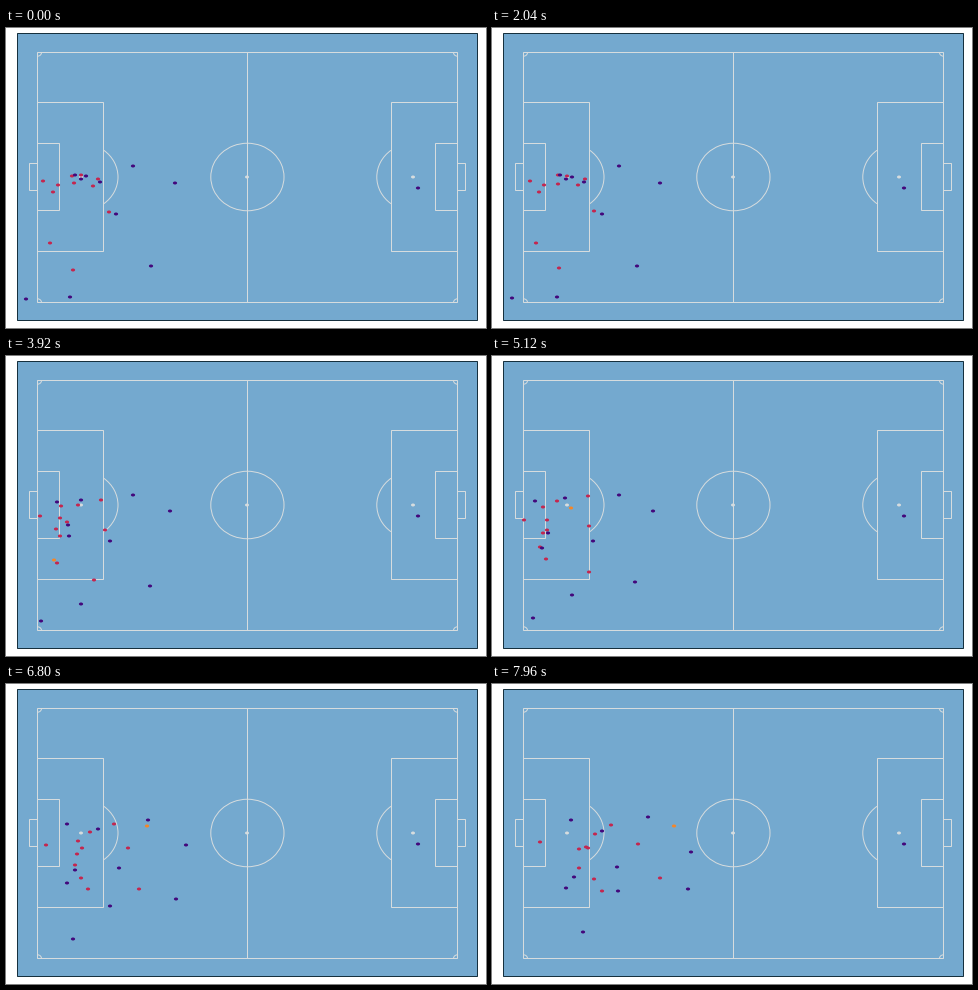
A matplotlib script that plays this animation: 480x300 px, repeating every 8000 ms.

```python
import numpy as np
import matplotlib.pyplot as plt
from matplotlib.animation import FuncAnimation
from matplotlib.collections import EllipseCollection
from matplotlib.patches import Arc, Ellipse, Rectangle

W, H, DPI = 480, 300, 100
FRAMES, STEP = 200, 40
PX = 72 / DPI

GRASS, CHALK, EDGE = "#74a9cf", "#d6dcde", "#16303e"
DARK, RED, BALL = "#43087c", "#c4264f", "#f58628"

LEFT, RIGHT, TOP, BOTTOM = 31, 451, 24, 274
MX, MY = 241, 149
SX, SY = 4.0, 3.69          # pixels per metre
RX, RY = 9.15 * SX, 9.15 * SY

KICK, CLEAR, END = 3120, 5120, 7960   # corner taken, defence moves out, loop end

# Each player: waiting place, place after the corner, place after moving out.
REDS = [
    (37, 152.5, 32, 164, 48, 158.5), (47, 163.5, 51, 177, 87, 184),
    (52, 157, 55, 164.5, 96, 164.5), (66, 147.5, 50, 151, 94, 163.5),
    (75, 147, 54, 175, 87, 165), (68, 155, 47, 192, 102, 195.5),
    (87, 158, 64, 145, 103, 150), (92, 151, 96, 140, 119, 140.5),
    (103, 184, 97, 169, 146, 160), (44, 215, 54, 203, 110, 206.5),
    (67, 242, 98, 215.5, 168, 194),
]
DARKS = [
    (69, 147, 42, 144.5, 79, 136), (75, 150.5, 55, 178, 82, 193),
    (80, 148, 73, 142, 110, 147), (94, 153.5, 48, 193, 74, 204.5),
    (127, 138, 127, 139, 156, 133), (169, 155, 161, 155, 199, 167.5),
    (110, 186, 101, 185, 125, 183), (145, 238.5, 143, 226, 196, 204.5),
    (64, 269, 81, 238, 126, 206.5), (20, 271, 42, 262, 91, 248),
]
KEEPER = (412, 160)

wait, corner, out = np.array(REDS + DARKS, float).reshape(-1, 3, 2).swapaxes(0, 1)
rng = np.random.default_rng(4)
sway = rng.uniform(-1.2, 1.2, wait.shape)
pace = rng.uniform(1500, 2600, (len(wait), 1))

fig = plt.figure(figsize=(W / DPI, H / DPI), dpi=DPI, facecolor="white")
ax = fig.add_axes([0, 0, 1, 1])
ax.set_xlim(0, W)
ax.set_ylim(H, 0)
ax.axis("off")


def box(x0, y0, x1, y1, color=CHALK, fill="none"):
    ax.add_patch(Rectangle((x0, y0), x1 - x0, y1 - y0, lw=PX, ec=color, fc=fill))


def arc(x, y, rx, ry, a, b):
    ax.add_patch(Arc((x, y), 2 * rx, 2 * ry, theta1=a, theta2=b, color=CHALK, lw=PX))


def spot(x):
    ax.add_patch(Ellipse((x, MY), 4, 3, fc=CHALK, ec="none"))


def draw_pitch():
    box(11, 5, 471, 292, EDGE, GRASS)
    box(LEFT, TOP, RIGHT, BOTTOM)
    ax.plot([MX, MX], [TOP, BOTTOM], color=CHALK, lw=PX)
    arc(MX + 0.4, MY, RX, RY, 0, 360)
    spot(MX)
    for goal, side, turn in ((LEFT, 1, 0), (RIGHT, -1, 180)):
        box(goal, 74, goal + side * 66, 223)
        box(goal, 115, goal + side * 22, 182)
        box(goal - side * 8, 135, goal, 162)
        centre = goal + side * 11 * SX
        spot(centre)
        arc(centre + 0.4, MY, RX, RY, turn - 50, turn + 50)
    for x, y, a in ((LEFT, TOP, 0), (RIGHT, TOP, 90),
                    (RIGHT, BOTTOM, 180), (LEFT, BOTTOM, 270)):
        arc(x + 0.5, y + 0.5, SX, SY, a, a + 90)


def players_at(t):
    drop = 1 / (1 + np.exp((3600 - t) / 450))
    push = np.clip((t - CLEAR) / (END - CLEAR), 0, 1) ** 1.3
    jostle = sway * np.sin(2 * np.pi * t / pace) * (1 - drop)
    return wait + (corner - wait) * drop + (out - corner) * push + jostle


def ball_at(t):
    if t < KICK:
        return -20, -20
    times = [KICK, 4280, CLEAR, 6800, END]
    return (np.interp(t, times, [32, 55, 79, 141, 182]),
            np.interp(t, times, [273, 173, 152, 142.5, 142]))


def places(t):
    return np.round(np.vstack([players_at(t), KEEPER, ball_at(t)]))


draw_pitch()
colors = [RED] * len(REDS) + [DARK] * (len(DARKS) + 1) + [BALL]
n = len(colors)
dots = EllipseCollection([4.2] * n, [3] * n, [0] * n, units="xy",
                         offsets=places(0), offset_transform=ax.transData,
                         facecolors=colors, edgecolors="none", zorder=5)
ax.add_collection(dots)


def update(i):
    dots.set_offsets(places(i * STEP))
    return [dots]


anim = FuncAnimation(fig, update, frames=FRAMES, interval=STEP,
                     repeat=True, repeat_delay=0, blit=False)
plt.show()
```
